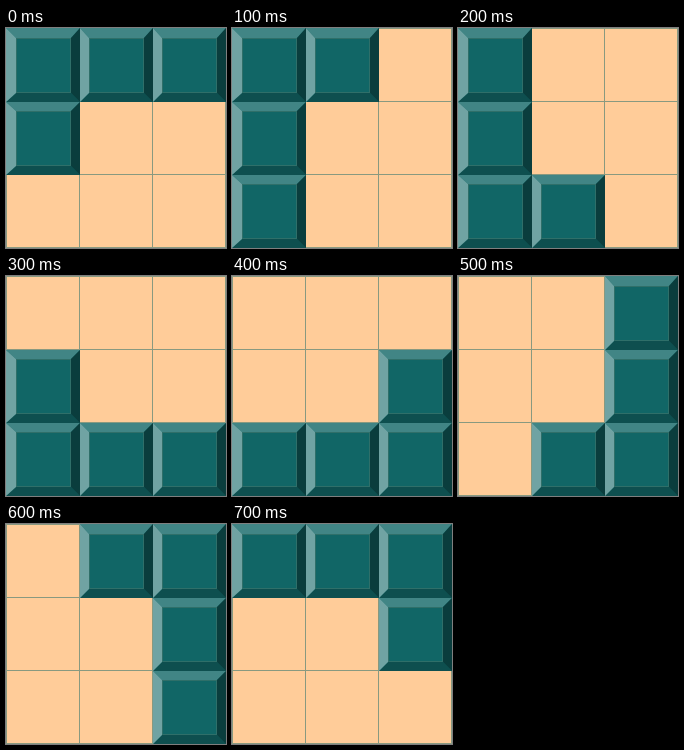
These frames come from a looping animation (220x220 px, 800 ms). An HTML page with a canvas:

```html
<!DOCTYPE html>
<html lang="en">
<head>
<meta charset="utf-8">
<title>Tiles circling a grid</title>
<style>
  html, body { margin: 0; width: 100%; height: 100%; overflow: hidden; background: #ffcc99; }
  canvas { display: block; width: 220px; height: 220px; }
</style>
</head>
<body>
<canvas id="stage" width="220" height="220"></canvas>
<script>
const ctx = document.getElementById('stage').getContext('2d');
const SIZE = 220, CELL = 73, BEVEL = 9, STEP = 100;
const PEACH = '#ffcc99', TEAL = '#116666', LINE = '#889980', RIM = '#2f6f69';
const LEFT = '#70a3a3', TOP = '#418585', RIGHT = '#0a3d3d', BOTTOM = '#0e4f4f';

// Outer cells, clockwise from the top left: [column, row]
const RING = [[0, 0], [1, 0], [2, 0], [2, 1], [2, 2], [1, 2], [0, 2], [0, 1]];

function poly(color, ...points) {
  ctx.fillStyle = color;
  ctx.beginPath();
  for (const [x, y] of points) ctx.lineTo(x, y);
  ctx.fill();
}

function rect(color, x, y, w, h) {
  ctx.fillStyle = color;
  ctx.fillRect(x, y, w, h);
}

function drawTile([col, row]) {
  const x0 = col ? col * CELL + 1 : 0, y0 = row ? row * CELL + 1 : 0;
  const x1 = (col + 1) * CELL + 1, y1 = (row + 1) * CELL + 1;
  const l = col * CELL + 1 + BEVEL, t = row * CELL + 1 + BEVEL;
  const r = x1 - BEVEL, b = y1 - BEVEL;
  rect(TEAL, x0, y0, x1 - x0, y1 - y0);
  poly(TOP, [x0, y0], [x1, y0], [r, t], [l, t]);
  poly(BOTTOM, [x0, y1], [l, b], [r, b], [x1, y1]);
  poly(LEFT, [x0, y0], [l, t], [l, b], [x0, y1]);
  poly(RIGHT, [x1, y0], [x1, y1], [r, b], [r, t]);
  ctx.strokeStyle = RIM;
  ctx.strokeRect(l + 0.5, t + 0.5, r - l - 1, b - t - 1);
}

function draw(step) {
  rect(PEACH, 0, 0, SIZE, SIZE);
  for (let i = 0; i <= 3; i++) {
    rect(LINE, i * CELL, 0, 1, SIZE);
    rect(LINE, 0, i * CELL, SIZE, 1);
  }
  // Four neighbouring tiles move one cell anticlockwise per step
  for (let i = 0; i < 4; i++) drawTile(RING[(15 - step + i) % 8]);
}

const start = performance.now();
function tick(now) {
  draw(Math.floor(Math.max(0, now - start) / STEP) % RING.length);
  requestAnimationFrame(tick);
}
draw(0);
requestAnimationFrame(tick);
</script>
</body>
</html>
```
